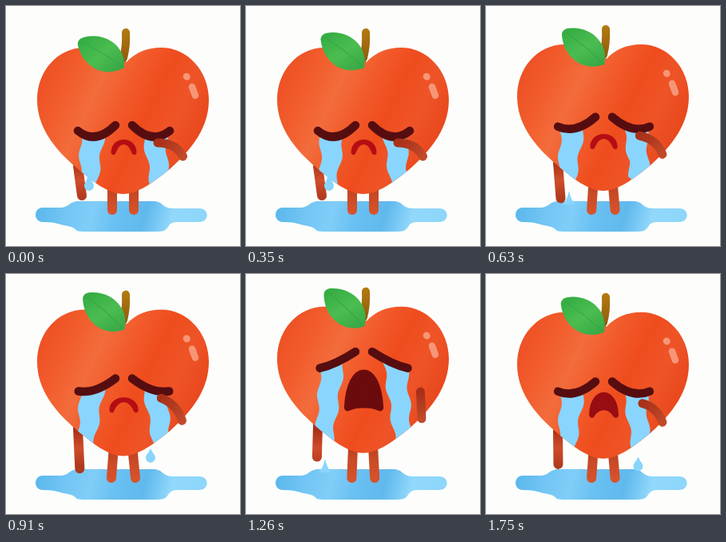
An HTML page with a canvas that plays this animation: 293x300 px, repeating every 1.82 s.

```html
<!DOCTYPE html>
<html lang="en">
<head>
<meta charset="utf-8">
<title>Crying fruit</title>
<style>
html, body { margin: 0; width: 100%; height: 100%; overflow: hidden; background: #fdfefc; }
canvas { display: block; width: 293px; height: 300px; }
</style>
</head>
<body>
<canvas id="stage"></canvas>
<script>
const canvas = document.getElementById('stage');
const ctx = canvas.getContext('2d');
const scale = window.devicePixelRatio || 1;
canvas.width = 293 * scale;
canvas.height = 300 * scale;

const LOOP = 1820, STEP = 70, PEAK = 1540, AXIS = 147.5;
const WATER = '#89d5fd';

const heart = new Path2D('M151 70C162 58 177 52 194 52C228 52 254 82 254 117C254 151 234 178 206 203' +
  'C186 219 166 235 147 235C128 235 108 219 88 202C60 178 39 151 39 117C39 82 64 52 99 52C119 52 138 58 151 70Z');
const puddle = new Path2D('M46 252H67C80 252 78 244 92 244H184C198 244 194 253 210 253H242' +
  'C255 253 255 270 242 270H216C198 270 208 282 190 282H98C82 282 91 277 77 275C66 273 62 270 46 270C34 270 34 252 46 252Z');
const leaf = new Path2D('M0 0C-12 -25 -45 -27 -64 -6Q-68 -1 -65 4C-45 26 -14 24 0 0Z');

const clamp = v => Math.min(1, Math.max(0, v));
const smooth = v => v * v * (3 - 2 * v);

// Builds up from start to full, holds until the peak, then collapses by the end of the loop.
const surge = (time, start, full = PEAK) =>
  Math.min(clamp((time - start) / (full - start)), clamp((LOOP - time) / (LOOP - PEAK)));

function gradient(x1, y1, x2, y2, ...colors) {
  const g = ctx.createLinearGradient(x1, y1, x2, y2);
  colors.forEach((c, i) => g.addColorStop(i / (colors.length - 1), c));
  return g;
}

function stroke(width, color, x, y, ...rest) {
  ctx.beginPath();
  ctx.moveTo(x, y);
  if (rest.length === 4) ctx.quadraticCurveTo(...rest);
  else ctx.lineTo(...rest);
  ctx.lineWidth = width;
  ctx.strokeStyle = color;
  ctx.stroke();
}

function mirrored(drawSide) {
  drawSide(0);
  ctx.save();
  ctx.translate(2 * AXIS, 0);
  ctx.scale(-1, 1);
  drawSide(1);
  ctx.restore();
}

function drawLimbs(sob, wail, lift, swing) {
  const spread = 2 * Math.sin(Math.PI * sob);
  const leg = gradient(0, 215 + lift, 0, 260, '#a83a1f', '#c94a26', '#d9532b');
  stroke(12, leg, 133 + spread, 222 + lift, 133 - spread / 2, 255);
  stroke(12, leg, 160 - spread, 222 + lift, 160 + spread, 255);
  stroke(12, gradient(0, 195, 0, 240, '#a83118', '#cf4d2a', '#b03a1e'),
    90, 200 + lift, 95 - 5 * sob - 12 * swing, 237 + 12 * sob - 18 * wail);
}

function drawBody(lift, turn) {
  ctx.save();
  ctx.translate(0, lift);
  ctx.fillStyle = gradient(50, 80, 235, 170, '#ee5125', '#f25d2c', '#f36c3c', '#f25a2a', '#ef4c1d', '#ee5427', '#e9491e');
  ctx.fill(heart);
  const shine = 'rgba(255, 205, 185, .55)';
  stroke(8.5, shine, 226, 88, 226.5, 88.5);
  stroke(8.5, shine, 233, 101, 237, 112);
  stroke(10, gradient(0, 28, 0, 70, '#b47a10', '#8f5a0c'), 150, 33, 151, 50, 147, 65);
  ctx.translate(148, 77);
  ctx.rotate((30 + turn) * Math.PI / 180);
  ctx.fillStyle = gradient(-60, -10, -5, 10, '#35ad43', '#4bbd50', '#38a845');
  ctx.fill(leaf);
  stroke(1, '#35a544', -62, -1, -30, -3, -2, 0);
  ctx.restore();
}

function drawStream(eyeY, lift, flow) {
  const start = eyeY(0.4), bottom = 224 + lift;
  const edge = (y, dir) => {
    const u = (y - start) / (bottom - start);
    return 108 + (lift / 2 - 5) * u + dir * (14.5 - 4 * u) + 2 * Math.sin(y * 0.16 - flow);
  };
  ctx.beginPath();
  for (let y = eyeY(0.15); y < bottom; y += 2) ctx.lineTo(edge(y, -1), y);
  for (let y = bottom; y > eyeY(0.7); y -= 2) ctx.lineTo(edge(y, 1), y);
  ctx.fillStyle = WATER;
  ctx.fill();
}

// A drop swells, lets go at the release time, falls and splashes.
function drawDrip(x, hang, release, swell, time) {
  const fall = time - release;
  if (fall < -swell) return;
  const y = hang + Math.max(0, fall) ** 2 * 0.0009;
  ctx.fillStyle = WATER;
  ctx.beginPath();
  if (y < 246) {
    const r = 6 * clamp((fall + swell + STEP) / 140);
    const tip = y - (fall <= 0 ? 21 : 12);
    ctx.moveTo(x, tip);
    ctx.bezierCurveTo(x + 2, y - 6, x + r, y - 4, x + r, y);
    ctx.arc(x, y, r, 0, Math.PI);
    ctx.bezierCurveTo(x - r, y - 4, x - 2, y - 6, x, tip);
  } else if (fall < 280) {
    ctx.moveTo(x - 9, 248);
    ctx.quadraticCurveTo(x - 3, 245, x, 231);
    ctx.quadraticCurveTo(x + 3, 245, x + 9, 248);
  }
  ctx.fill();
}

function drawMouth(sob, wail) {
  const open = Math.sqrt(wail);
  const base = 183 - 24 * sob + 3 * wail;
  const half = 13 + 4 * sob + 4 * wail;
  const control = rise => base - rise * 4 / 3;
  const outer = control(13 + 30 * open), inner = control(13 - 9 * open);
  const shoulder = half * (1 - 0.15 * open);
  ctx.beginPath();
  ctx.moveTo(AXIS - half, base);
  ctx.bezierCurveTo(AXIS - shoulder, outer, AXIS + shoulder, outer, AXIS + half, base);
  ctx.bezierCurveTo(AXIS + half / 2, inner, AXIS - half / 2, inner, AXIS - half, base);
  ctx.closePath();
  ctx.fillStyle = ctx.strokeStyle = `rgb(${180 - 72 * open}, ${14 - 3 * open}, ${20 - 6 * open})`;
  ctx.lineWidth = 6 + 3 * open;
  ctx.fill();
  ctx.stroke();
}

function draw(time) {
  const sob = surge(time, 350) ** 0.85;
  const wail = smooth(surge(time, 910, 1230));
  const lift = -14 * sob;

  ctx.setTransform(scale, 0, 0, scale, 0, 0);
  ctx.fillStyle = '#fdfefc';
  ctx.fillRect(0, 0, 293, 300);
  ctx.lineCap = ctx.lineJoin = 'round';

  ctx.fillStyle = gradient(45, 240, 235, 290, '#5db8ec', '#72c5f4', '#80cdf8', '#68bff1', '#60b9ed', '#92d8fb', '#8ed6fb');
  ctx.fill(puddle);
  drawLimbs(sob, wail, lift, surge(time, 1200));
  drawBody(lift, 14 * Math.sqrt(surge(time, 0)));

  const outerX = 90 + 5 * sob ** 3;
  const outerY = 156 - 18 * sob - 24 * wail;
  const bendY = 174 - 46 * sob - 24 * wail;
  const innerY = 149 - 35 * sob - 24 * wail;
  const eyeY = u => (1 - u) ** 2 * outerY + 2 * u * (1 - u) * bendY + u * u * innerY;

  // Both tear streams stay within the body outline.
  ctx.save();
  ctx.translate(0, lift);
  ctx.clip(heart);
  ctx.translate(0, -lift);
  mirrored(side => drawStream(eyeY, lift, time / LOOP * Math.PI * 6 + 2 * side));
  ctx.restore();

  drawDrip(104, 225, 380, 520, time);
  drawDrip(181, 212, 770, 140, time);
  drawDrip(99, 213, 1060, 80, time);
  drawDrip(190.5, 211, 1570, 240, time);

  mirrored(() => stroke(10.5, '#560d10', outerX, outerY, 112, bendY, 137, innerY));
  drawMouth(sob, wail);

  const handX = 190 + 8 * sob + 22 * wail, handY = 171 - 30 * sob;
  const elbowX = 221.5 - 2 * sob, elbowY = 188 - 9 * sob;
  const bend = (elbowX - handX) / 4;
  stroke(11, gradient(handX, handY, elbowX, elbowY, '#a93018', '#b23c20', '#c24a2a'), handX, handY,
    (handX + elbowX) / 2 + bend, (handY + elbowY) / 2 - bend, elbowX, elbowY);
}

function frame() {
  draw(Math.floor(performance.now() % LOOP / STEP) * STEP);
  requestAnimationFrame(frame);
}
frame();
</script>
</body>
</html>
```
